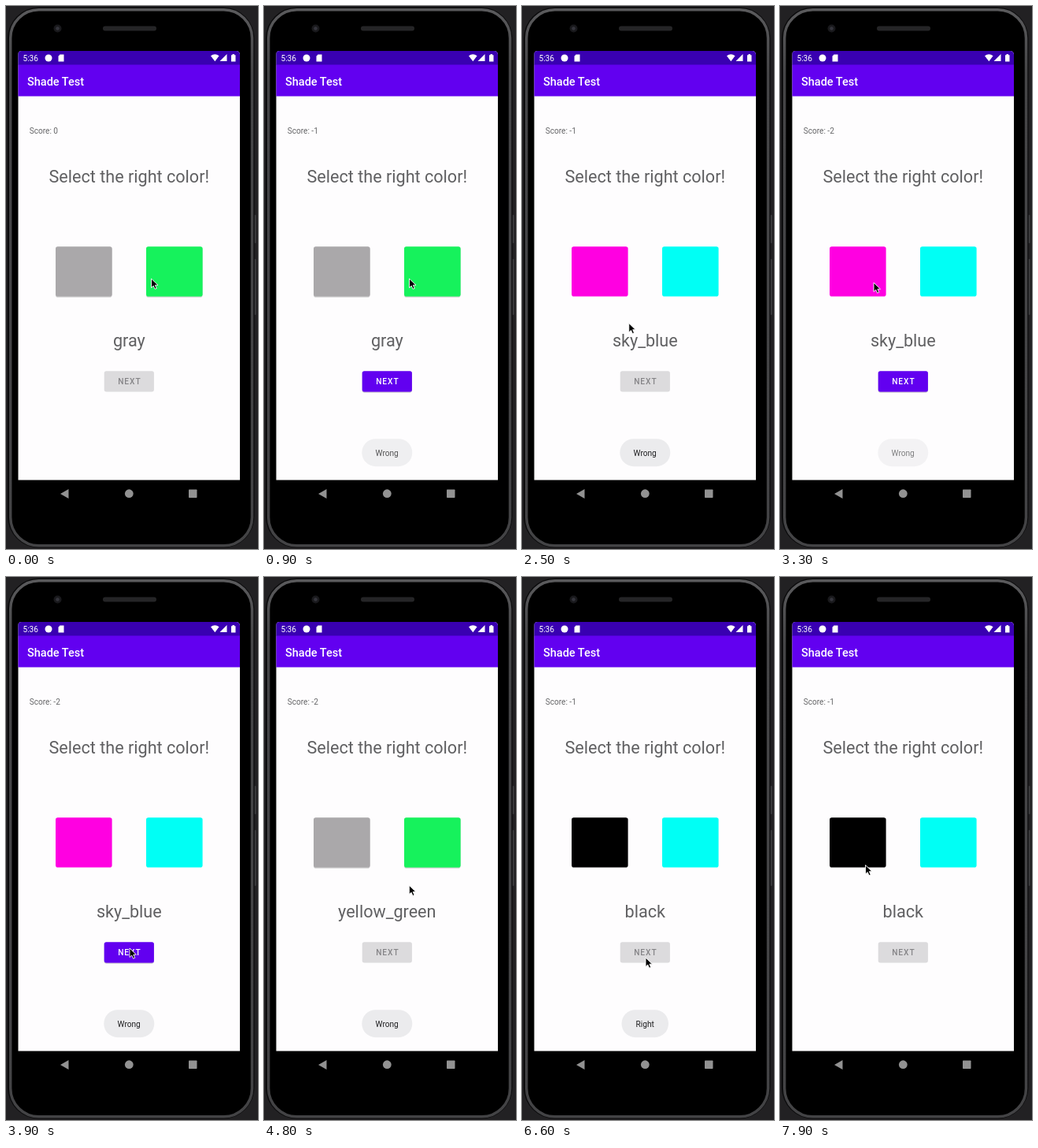
Recreate the animation shown at these times as an HTML page. Size 320 by 689 pixels, loop 8 s.

```html
<!DOCTYPE html>
<html lang="en">
<head>
<meta charset="utf-8">
<title>Shade Test</title>
<style>
html, body { margin: 0; width: 100%; height: 100%; overflow: hidden; background: #222123; }
svg { display: block; width: 320px; height: 689px; font-family: Roboto, sans-serif; }
.mid { text-anchor: middle; }
.big { font-size: 21.6px; fill: #606062; }
.small { font-size: 10.1px; }
.medium { font-weight: 500; }
</style>
</head>
<body>
<svg viewBox="0 0 320 689">
  <defs>
    <filter id="shadow" x="-10%" y="-10%" width="120%" height="130%">
      <feDropShadow dx="0" dy=".8" stdDeviation=".5" flood-opacity=".32"/>
    </filter>
    <linearGradient id="rim" x2="0" y2="1">
      <stop offset="0" stop-color="#5a5a5c"/>
      <stop offset=".12" stop-color="#454547"/>
      <stop offset="1" stop-color="#434345"/>
    </linearGradient>
    <clipPath id="screen"><path d="M15 602V62Q15 57 20 57H292Q297 57 297 62V602Z"/></clipPath>
  </defs>

  <!-- Phone -->
  <rect x="315.500" y="265" width="2" height="36" rx="1" fill="#414143"/>
  <rect x="315.500" y="321" width="2" height="71" rx="1" fill="#414143"/>
  <rect x="2" y="1.500" width="313.500" height="686" rx="40" fill="#0b0b0c"/>
  <rect x="5.700" y="4.800" width="306.800" height="680" rx="36" fill="#000" stroke="url(#rim)" stroke-width="3.500"/>
  <rect x="123" y="25.500" width="68" height="6" rx="3" fill="#252527"/>
  <circle cx="65.500" cy="28.500" r="5" fill="#19191c"/>
  <circle cx="65.500" cy="28.500" r="2.300" fill="#34343c"/>
  <g fill="#929292">
    <path d="M69 619 79.500 613V625Z"/>
    <circle cx="156.300" cy="618.700" r="5.400"/>
    <rect x="232" y="613.500" width="10.500" height="10.500" rx=".7"/>
  </g>

  <!-- Screen -->
  <g clip-path="url(#screen)">
    <rect x="15.500" y="57" width="281.500" height="544.500" fill="#fefdfe"/>
    <rect x="15.500" y="57" width="281.500" height="18" fill="#3900b1"/>
    <rect x="15.500" y="74.500" width="281.500" height="40" fill="#6200f0"/>
  </g>
  <g fill="#fff">
    <text class="small" x="21.500" y="69.700">5:36</text>
    <circle cx="54" cy="66" r="4.500"/>
    <path d="M68.500 61.500H73.500V70.500H66.500V63.700Z"/>
    <path d="M260 63.300Q265.300 59.300 270.600 63.300L265.300 70.300Z"/>
    <path d="M280.500 61V70H271.500Z"/>
    <path d="M286 62.200H287.500V61H290V62.200H291.500V70.500H286Z"/>
    <text class="medium" x="27" y="100.700" font-size="14.500">Shade Test</text>
  </g>
  <text id="score" class="small" x="29.700" y="161.700" fill="#656567"></text>
  <text class="big mid" x="156.300" y="224">Select the right color!</text>
  <rect id="left" x="63" y="305.200" width="71.600" height="63.300" rx="2.800"/>
  <rect id="right" x="178" y="305.200" width="71.600" height="63.300" rx="2.800"/>
  <text id="word" class="big mid" x="156.300" y="432"></text>
  <rect id="next" x="124.700" y="463.200" width="63.200" height="26.200" rx="2.600"/>
  <text id="label" class="medium mid" x="156.900" y="480.400" font-size="10.200" letter-spacing=".95">NEXT</text>
  <g id="wrong">
    <rect x="124.300" y="549.200" width="64" height="35" rx="17.500" fill="#ebebed"/>
    <text class="small mid" x="156.200" y="570.700" fill="#1e1e20">Wrong</text>
  </g>
  <g id="correct">
    <rect x="126.500" y="549.200" width="59.500" height="35" rx="17.500" fill="#ebebed"/>
    <text class="small mid" x="156.200" y="570.700" fill="#1e1e20">Right</text>
  </g>
  <path id="cursor" d="M0 0V11.500L2.700 9 4.600 13.200 6.700 12.300 4.900 8.200H8.500Z"
    fill="#000" stroke="#fff" stroke-width=".9" stroke-linejoin="round"/>
</svg>
<script>
const LOOP = 8000;
const el = id => document.getElementById(id);
const set = (id, attrs) => {
  for (const name in attrs) el(id).setAttribute(name, attrs[name]);
};
const clamp = v => Math.max(0, Math.min(1, v));
const ease = v => v * v * (3 - 2 * v);

// answered: when NEXT becomes available
const rounds = [
  { start: 0, answered: 380, word: "gray", left: "#aaa8aa", right: "#19f25b", raised: true },
  { start: 2050, answered: 3090, word: "sky_blue", left: "#ff00e1", right: "#00fff5" },
  { start: 4050, answered: 5150, word: "yellow_green", left: "#aaa8aa", right: "#19f25b", raised: true },
  { start: 6600, answered: LOOP, word: "black", left: "#000", right: "#00fff5" }
];
const scores = [[0, 0], [380, -1], [3090, -2], [5150, -1]];

// time, x, y of the pointer tip
const path = [
  [0, 184.5, 346], [1250, 184.5, 346], [1750, 158, 471], [2200, 158, 471],
  [2750, 119, 351], [3550, 119, 351], [3900, 157, 471], [4050, 157, 471],
  [4200, 184, 392], [4780, 184, 392], [5100, 211, 332], [5850, 211, 332],
  [6300, 157, 483], [7350, 157, 483], [7850, 108.5, 365.5]
];

const latest = (list, t, time) => list.filter(item => time(item) <= t).pop();

function pointer(t) {
  const i = path.findIndex(p => p[0] > t);
  if (i < 0) return path[path.length - 1].slice(1);
  const [t0, x0, y0] = path[i - 1], [t1, x1, y1] = path[i];
  const k = ease((t - t0) / (t1 - t0));
  return [x0 + (x1 - x0) * k, y0 + (y1 - y0) * k];
}

const fade = (t, shown, hidden) =>
  ease(clamp((t - shown) / 500)) * (1 - ease(clamp((t - hidden) / 450)));

function draw(t) {
  const round = latest(rounds, t, r => r.start);
  const ready = t >= round.answered;
  const filter = on => on ? "url(#shadow)" : "none";
  el("score").textContent = "Score: " + latest(scores, t, s => s[0])[1];
  el("word").textContent = round.word;
  for (const side of ["left", "right"])
    set(side, { fill: round[side], filter: filter(round.raised) });
  set("next", { fill: ready ? "#6200f0" : "#dcdbdd", filter: filter(ready) });
  set("label", { fill: ready ? "#fff" : "#858487" });
  set("wrong", { opacity: Math.max(fade(t, 560, 2500), fade(t, 3030, 5180)) });
  set("correct", { opacity: fade(t, 5150, 7400) });
  set("cursor", { transform: `translate(${pointer(t)})` });
}

function frame() {
  draw(performance.now() % LOOP);
  requestAnimationFrame(frame);
}
frame();
</script>
</body>
</html>
```
